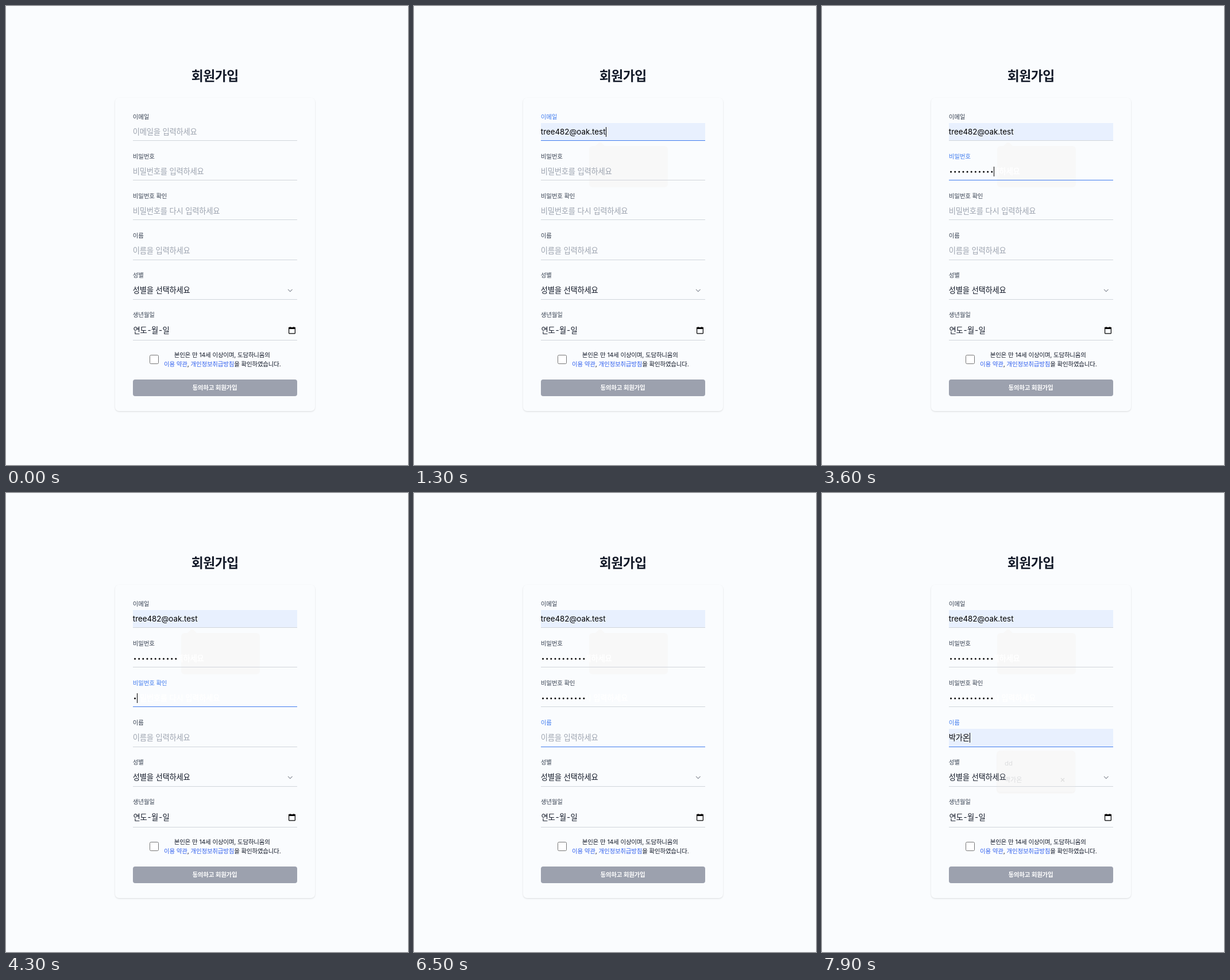
Recreate the animation shown at these times as an HTML page. Size 700 by 800 pixels, loop 8000 ms.

```html
<!DOCTYPE html>
<html lang="ko">
<head>
<meta charset="utf-8">
<title>회원가입</title>
<style>
  html, body { margin: 0; width: 100%; height: 100%; overflow: hidden; background: #fafcfe; }
  svg { display: block; width: 700px; height: 800px; }
  text {
    font: 400 13.333px Inter, "Noto Sans CJK KR", "Noto Sans CJK", sans-serif;
    letter-spacing: -.02em;
    word-spacing: .02em;
    fill: #111827;
    white-space: pre;
  }
  .title { font-size: 22.8px; font-weight: 700; }
  .label { font-size: 10.5px; font-weight: 500; fill: #374151; }
  .hint { fill: #9ca3af; }
  .hint.faded { fill: #fff; stroke: #fff; stroke-width: .6; }
  .value { fill: #000; }
  .latin { letter-spacing: 0; }
  .terms { font-size: 10.5px; }
  .link { fill: #2f5fee; }
  .send { font-size: 10.5px; font-weight: 700; fill: #fff; }
  .popup text { font: 11.5px "Open Sans", "Noto Sans CJK KR", sans-serif; letter-spacing: 0; }
  .popup .hangul { font-size: 11px; }
  .shade { fill: #f8f8f8; }
  .popup .shade { filter: drop-shadow(0 1px 1px rgba(0, 0, 0, .2)); }
  .card { fill: #fafcfe; filter: drop-shadow(0 1px 1px rgba(0, 0, 0, .13)); }
</style>
</head>
<body>
<svg viewBox="0 0 700 800">
  <text class="title" x="322.8" y="129.5">회원가입</text>
  <rect class="card" x="190" y="160" width="348" height="546" rx="7"/>

  <g id="ghost1" class="shade">
    <rect x="305" y="244" width="137" height="72" rx="6"/>
    <path d="M316 244l6-6h4l6 6z"/>
  </g>
  <g id="ghost2" class="shade">
    <rect x="304" y="449" width="137" height="75" rx="6"/>
  </g>

  <g id="fields"></g>

  <text x="220.8" y="500">성별을 선택하세요</text>
  <path d="M491 493.8l3.8 3.8 3.8-3.8" fill="none" stroke="#8f949e" stroke-width="1.2"/>
  <g>
    <text x="221.5" y="570">연도</text>
    <text x="246.5" y="570">-</text>
    <text x="253" y="570">월</text>
    <text x="266" y="570">-</text>
    <text x="272.6" y="570">일</text>
  </g>
  <path d="M492 560h12v3h-12zM494 559h1.4v1.5H494zM500.6 559h1.4v1.5h-1.4z"/>
  <rect x="492.6" y="560.6" width="10.8" height="10.3" rx="1" fill="none" stroke="#000" stroke-width="1.2"/>

  <rect x="250.5" y="608.5" width="15" height="15" rx="2" fill="#fff" stroke="#767676"/>
  <text class="terms" x="292.7" y="612.4">본인은 만 14세 이상이며, 도담하니움의</text>
  <text class="terms" x="275" y="627.6"><tspan class="link">이용 약관</tspan>, <tspan class="link">개인정보취급방침</tspan>을 확인하였습니다.</text>
  <rect x="221" y="651" width="286" height="29" rx="4" fill="#9ca1ae"/>
  <text class="send" x="324.4" y="669">동의하고 회원가입</text>

  <rect id="caret" width="1" height="17"/>

  <g id="popup1" class="popup">
    <path class="shade" d="M311 243h5l6-5h4l6 5h104q6 0 6 6v59q0 6-6 6h-125q-6 0-6-6v-59q0-6 6-6z"/>
    <text x="316" y="267">tree482@oak.test</text>
    <text x="316" y="298">1234!</text>
  </g>
  <g id="popup2" class="popup">
    <path class="shade" d="M311 450h5l6-5h4l6 5h103q6 0 6 6v59q0 6-6 6h-124q-6 0-6-6v-59q0-6 6-6z"/>
    <text x="318" y="475">dd</text>
    <text class="hangul" x="318" y="504">박가온</text>
    <path id="cross" d="M416 497l6 6m0-6l-6 6" stroke="#222" stroke-width="1.2"/>
  </g>
</svg>
<script>
  const LOOP = 8000, LEFT = 221, DOT = 7.125;
  const BLUE = '#3f7bee', BACK = '#fafcfe';
  const $ = id => document.getElementById(id);

  function add(parent, tag, attrs, content) {
    const el = document.createElementNS('http://www.w3.org/2000/svg', tag);
    for (const key in attrs) el.setAttribute(key, attrs[key]);
    if (content) el.textContent = content;
    return parent.appendChild(el);
  }

  // label, hint, line y, focus start and end
  const rows = [
    ['이메일', '이메일을 입력하세요', 234, 500, 1500],
    ['비밀번호', '비밀번호를 입력하세요', 303, 1500, 3800],
    ['비밀번호 확인', '비밀번호를 다시 입력하세요', 372, 3800, 6000],
    ['이름', '이름을 입력하세요', 442, 6000, 9000],
    ['성별', '', 511, 9000, 9000],
    ['생년월일', '', 582, 9000, 9000]
  ].map(([name, hint, line, from, to], i) => {
    const g = $('fields'), top = 197 + 69 * i;
    const row = { from, to, top };
    row.fill = add(g, 'rect', { x: LEFT, y: top + 7, width: 286, height: line - top - 7, fill: '#e8f0fe' });
    row.label = add(g, 'text', { class: 'label', x: 220.8, y: top }, name);
    row.hint = add(g, 'text', { class: 'hint', x: 220.8, y: top + 27 }, hint);
    row.line = add(g, 'rect', { x: LEFT, y: line, width: 286, height: 1 });
    return row;
  });

  // fields filled from a suggestion
  function autofill(row, at, text, cls) {
    row.filledAt = at;
    row.value = add($('fields'), 'text', { class: 'value ' + cls, x: 220.8, y: row.top + 27 }, text);
  }
  autofill(rows[0], 800, 'tree482@oak.test', 'latin');
  autofill(rows[3], 7400, '박가온', '');

  // password fields, one key time per dot
  function secret(row, keys) {
    const g = $('fields');
    row.keys = keys;
    row.cover = add(g, 'rect', { x: LEFT, y: row.top + 13, height: 18, fill: BACK });
    row.dots = keys.map((_, i) =>
      add(g, 'circle', { cx: LEFT + DOT * (i + .5), cy: row.top + 23, r: 1.5 }));
  }
  secret(rows[1], [2100, 2200, 2300, 2400, 2500, 2600, 2700, 2900, 3100, 3300, 3600]);
  secret(rows[2], [4300, 4400, 4600, 4700, 4700, 4800, 5000, 5100, 5300, 5500, 5700]);

  const show = (el, on) => { el.style.opacity = +on; };
  const within = (t, a, b) => t >= a && t < b;

  // last level whose time has come
  function level(t, steps) {
    let v = 0;
    for (const [at, value] of steps) if (t >= at) v = value;
    return v;
  }

  function drawRow(row, t) {
    const focus = level(t, [[row.from, .5], [row.from + 100, 1], [row.to, .5], [row.to + 100, 0]]);
    const tint = base => `color-mix(in srgb, ${BLUE} ${focus * 100}%, ${base})`;
    row.label.style.fill = tint('#374151');
    row.line.style.fill = tint('#d1d5db');

    const filled = t >= row.filledAt;
    show(row.fill, filled);
    if (row.value) {
      show(row.value, filled);
      show(row.hint, !filled);
    }
    if (row.keys) {
      const count = row.keys.filter(k => t >= k).length;
      row.dots.forEach((dot, i) => show(dot, i < count));
      row.cover.setAttribute('width', count * DOT);
      row.hint.classList.toggle('faded', count > 0);
      row.caretX = LEFT + Math.floor(count * DOT);
    }
  }

  function drawCaret(t) {
    const row = rows.find(r => within(t, r.from, r.to));
    const off = within(t, 1900, 2100) || within(t, 6500, 7000) || within(t, 7500, 7800);
    show($('caret'), row && !off ? 1 : 0);
    if (!row) return;
    let x = row.caretX || LEFT;
    if (row === rows[0] && t >= 1000) x = Math.round(LEFT + row.value.getComputedTextLength());
    if (row === rows[3] && t >= 7800) x = 257;
    $('caret').setAttribute('x', x);
    $('caret').setAttribute('y', row.top + 14);
  }

  function draw(t) {
    rows.forEach(row => drawRow(row, t));
    drawCaret(t);
    show($('popup1'), level(t, [[500, .5], [600, 1], [1000, .7], [1100, .4], [1200, .15], [1300, 0]]));
    show($('popup2'), level(t, [[7200, 1], [7800, .6], [7900, .12]]));
    show($('cross'), t >= 7400);
    show($('ghost1'), t >= 1000);
    show($('ghost2'), t >= 7800);
  }

  const start = performance.now();
  function tick() {
    draw((performance.now() - start) % LOOP);
    requestAnimationFrame(tick);
  }
  tick();
</script>
</body>
</html>
```
